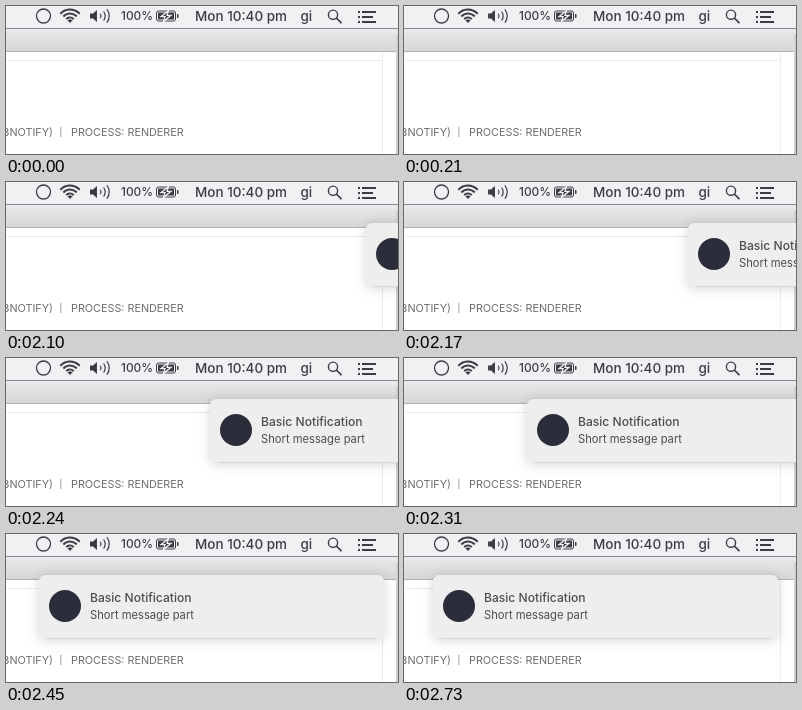
An HTML page with a canvas for the animation above (4760 ms loop, 392 px wide and 148 px high).

```html
<!DOCTYPE html>
<html lang="en">
<head>
<meta charset="utf-8">
<title>Desktop notification</title>
<style>
  html, body { margin: 0; width: 100%; height: 100%; overflow: hidden; background: #fff; }
  canvas { display: block; width: 392px; height: 148px; }
</style>
</head>
<body>
<canvas id="stage"></canvas>
<script>
const W = 392, H = 148, LOOP = 4760, STEP = 70, ENTER = 2100;
const INK = '#3c3c44', MENU = '#f1f1f3', LABEL = '#6e6e71';
const canvas = document.getElementById('stage');
const ctx = canvas.getContext('2d');
const dpr = window.devicePixelRatio || 1;
canvas.width = W * dpr;
canvas.height = H * dpr;

// Left edge of the banner per step: fast slide, slight overshoot, settle.
const slide = [360, 284, 204, 123, 67, 33, 23, 25, 27.5, 29];

function text(str, x, y, size, color, weight = 400, align = 'left') {
  ctx.font = `${weight} ${size}px Inter, sans-serif`;
  ctx.textAlign = align;
  ctx.fillStyle = color;
  ctx.fillText(str, x, y);
}

function rect(x, y, w, h, color) {
  ctx.fillStyle = color;
  ctx.fillRect(x, y, w, h);
}

function arc(x, y, r, from, to, width, color = INK) {
  ctx.beginPath();
  ctx.arc(x, y, r, from, to);
  ctx.lineWidth = width;
  ctx.strokeStyle = color;
  ctx.stroke();
}

function poly(points, color) {
  ctx.beginPath();
  points.forEach(([x, y]) => ctx.lineTo(x, y));
  ctx.closePath();
  ctx.fillStyle = color;
  ctx.fill();
}

function disc(x, y, r, color) {
  ctx.beginPath();
  ctx.arc(x, y, r, 0, Math.PI * 2);
  ctx.fillStyle = color;
  ctx.fill();
}

function round(x, y, w, h, r) {
  ctx.beginPath();
  ctx.roundRect(x, y, w, h, r);
}

function wifi(x, y) {
  const up = -Math.PI / 2, spread = 0.84;
  for (const r of [5, 9, 13]) arc(x, y, r, up - spread, up + spread, 2);
  poly([[x, y + 0.5], [x - 2.6, y - 2.2], [x, y - 3.2], [x + 2.6, y - 2.2]], INK);
}

function speaker(x, y) {
  poly([[x, y - 2.5], [x + 3, y - 2.5], [x + 7, y - 6], [x + 7, y + 6], [x + 3, y + 2.5], [x, y + 2.5]], INK);
  for (const r of [4, 8, 12]) arc(x + 7, y, r, -0.6, 0.6, 1.2);
}

function battery(x, y) {
  round(x + 0.5, y + 0.5, 19, 10, 2);
  ctx.lineWidth = 1;
  ctx.strokeStyle = INK;
  ctx.stroke();
  rect(x + 2, y + 2, 16, 7, INK);
  rect(x + 21, y + 3.5, 1.5, 4, INK);
  const bolt = [[12.5, 0], [5, 6.2], [9, 6.2], [7.5, 11], [15, 4.8], [11, 4.8]]
    .map(([a, b]) => [x + a, y + b]);
  poly(bolt, INK);
  ctx.lineWidth = 1.3;
  ctx.strokeStyle = MENU;
  ctx.stroke();
}

function search(x, y) {
  arc(x, y, 4.6, 0, Math.PI * 2, 1.4);
  ctx.beginPath();
  ctx.moveTo(x + 3.3, y + 3.3);
  ctx.lineTo(x + 8.5, y + 8.5);
  ctx.lineWidth = 1.7;
  ctx.stroke();
}

function list(x, y) {
  [14, 11, 14].forEach((width, i) => {
    rect(x, y + i * 5, 2, 2, INK);
    rect(x + 4, y + i * 5, width, 2, INK);
  });
}

function menuBar() {
  rect(0, 0, W, 22, MENU);
  rect(0, 22, W, 1, '#8b898f');
  arc(37.5, 10, 7, 0, Math.PI * 2, 1.3);
  wifi(64, 16.5);
  speaker(84, 10);
  text('100%', 115, 14, 11.9, INK, 500);
  battery(150, 4.5);
  text('Mon 10:40 pm', 189, 15, 13.5, INK, 500);
  text('gi', 294.5, 15, 13.5, INK, 500);
  search(327, 8.7);
  list(352, 5);
}

function appWindow() {
  rect(0, 23, W, H, '#fff');
  const bar = ctx.createLinearGradient(0, 23, 0, 45);
  bar.addColorStop(0, '#eae8eb');
  bar.addColorStop(1, '#d8d6d9');
  rect(0, 23, W, 22, bar);
  rect(0, 45, W, 1, '#b3b1b5');
  rect(0, 54, 377, 1, '#ececec');
  rect(376, 46, 1, H, '#ececec');
  rect(390, 28, 2, H, '#d0d0d1');
  text('BNOTIFY)', 47, 130, 10.8, LABEL, 400, 'right');
  text('|', 53.5, 129, 8.5, LABEL);
  text('PROCESS: RENDERER', 65, 130, 10.8, LABEL);
}

function banner(x) {
  ctx.save();
  ctx.shadowColor = 'rgba(0,0,0,.17)';
  ctx.shadowBlur = 11 * dpr;
  ctx.shadowOffsetY = 1 * dpr;
  round(x, 41, 345, 64, 6);
  ctx.fillStyle = '#eeeeef';
  ctx.fill();
  ctx.restore();
  rect(x + 8, 104, 329, 1, '#d7d7d8');
  disc(x + 26, 72, 16, '#2b2e3a');
  text('Basic Notification', x + 51, 68, 12.1, '#4d4d51', 500);
  text('Short message part', x + 51, 85, 11.2, '#4d4d51');
}

function draw(now) {
  const t = now % LOOP;
  ctx.setTransform(dpr, 0, 0, dpr, 0, 0);
  appWindow();
  menuBar();
  if (t >= ENTER) {
    const step = Math.floor((t - ENTER) / STEP);
    banner(slide[Math.min(step, slide.length - 1)]);
  }
}

const start = performance.now();
function tick() {
  draw(performance.now() - start);
  requestAnimationFrame(tick);
}
tick();
</script>
</body>
</html>
```
